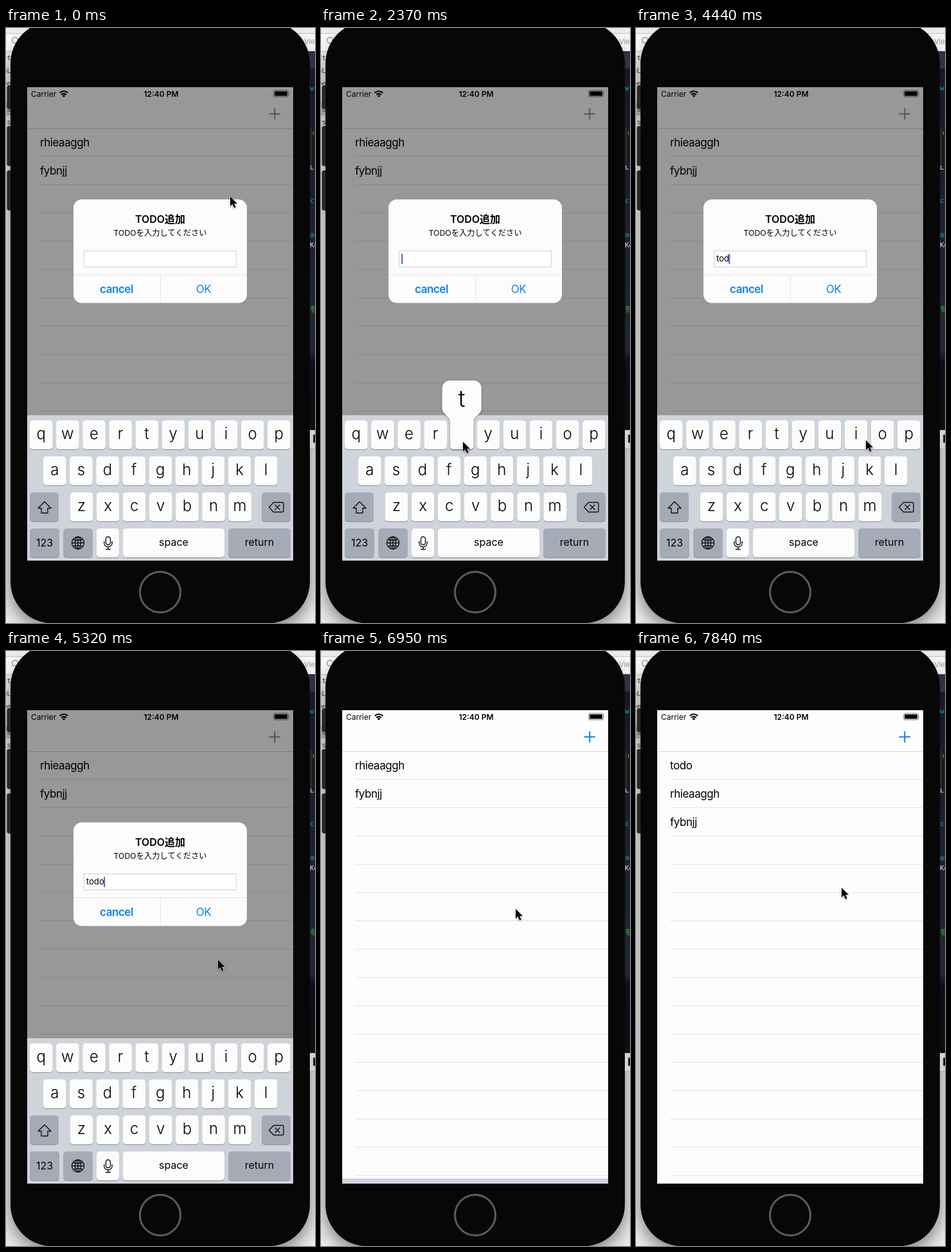
An HTML page for the animation above (7.99 s loop, 481 by 925 pixels).

```html
<!DOCTYPE html>
<html lang="ja">
<head>
<meta charset="utf-8">
<title>Todo entry</title>
<style>
html, body { margin: 0; width: 100%; height: 100%; overflow: hidden; background: #e9e9e9; }
svg { display: block; width: 100%; height: 100%; font-family: Inter, 'Noto Sans CJK JP', 'Noto Sans CJK', sans-serif; }
.mid { text-anchor: middle; }
.body { font-size: 17px; letter-spacing: -.45px; }
.line { fill: none; stroke: #111; stroke-width: 1.4; stroke-linejoin: round; }
.letter { font-size: 24px; font-weight: 300; text-anchor: middle; }
.code { font: 11px 'DejaVu Sans Mono', 'Noto Sans CJK JP', monospace; }
</style>
</head>
<body>
<svg viewBox="0 0 481 925">
  <defs>
    <filter id="blur" x="-20%" width="140%"><feGaussianBlur stdDeviation="14"/></filter>
    <filter id="soft" x="-40%" y="-40%" width="180%" height="180%"><feDropShadow dx="0" dy="1" stdDeviation="1.5" flood-opacity=".4"/></filter>
    <clipPath id="screen"><path d="M33 92h414v736H33z"/></clipPath>
    <clipPath id="list"><path d="M33 157h414v671H33z"/></clipPath>
    <linearGradient id="editor" x2="0" y2="1">
      <stop stop-color="#161a24"/><stop offset=".78" stop-color="#202634"/><stop offset=".81" stop-color="#0d1018"/><stop offset="1" stop-color="#0a0d14"/>
    </linearGradient>
  </defs>

  <!-- desktop behind the phone -->
  <path fill="#ececec" d="M0 0h481v925H0z"/>
  <path fill="#f7f7f7" d="M0 8h481v28H0z"/>
  <path stroke="#c4c4c4" d="M0 8.500h481M0 36.500h481"/>
  <circle class="line" cx="14" cy="19" r="4.500" style="stroke:#999"/>
  <path fill="#c2c2c2" d="M0 116h9v20H0z"/>
  <rect x="7" y="14" width="466" height="920" rx="65" opacity=".5" filter="url(#blur)"/>
  <path fill="url(#editor)" d="M470 63h11v562h-11z"/>
  <path fill="#2c3240" d="M470 36h11v27h-11z"/>
  <path fill="#d2d2d2" d="M470 625h11v28h-11z"/>
  <path stroke="#aaa" d="M470 653.500h11M481 632h-3v13h3"/>
  <text x="464" y="25" font-size="11" fill="#a08c80">View</text>
  <g id="fragments"></g>

  <!-- phone -->
  <g fill="#292929" stroke="#111">
    <rect x="2" y="90" width="10" height="35" rx="2"/>
    <rect x="2" y="153" width="10" height="61" rx="2"/>
    <rect x="2" y="222" width="10" height="61" rx="2"/>
    <rect x="466" y="153" width="11.500" height="60" rx="2"/>
  </g>
  <rect x="7" y="-10" width="466" height="935.500" rx="65" fill="#070707"/>
  <circle cx="240" cy="877" r="31.500" fill="none" stroke="#5c5c5c" stroke-width="3"/>

  <g clip-path="url(#screen)">
    <path fill="#fdfdfd" d="M33 92h414v736H33z"/>
    <path id="separators" stroke="#e2e2e4"/>
    <path stroke="#d2d2d3" d="M33 156.500h414"/>
    <g class="body" clip-path="url(#list)">
      <text id="newRow" x="53">todo</text>
      <g id="oldRows"><text x="53" y="184">rhieaaggh</text><text x="53" y="228">fybnjj</text></g>
    </g>
    <path id="dim" fill="#000" opacity=".4" d="M33 92h414v736H33z"/>
    <text x="39" y="107" font-size="12">Carrier</text>
    <text class="mid" x="241.500" y="107" font-size="12" font-weight="600">12:40 PM</text>
    <g fill="none" stroke="#000" stroke-width="2.200">
      <path d="M83.700 100.800a9 9 0 0 1 12.600 0M86.200 103.600a5.400 5.400 0 0 1 7.600 0"/>
    </g>
    <path d="M90 107.800l-2.300-2.400a3.300 3.300 0 0 1 4.600 0z"/>
    <rect x="416.500" y="97" width="23" height="10" rx="2.500" fill="none" stroke="#000" stroke-opacity=".5"/>
    <rect x="418" y="98.500" width="20" height="7" rx="1"/>
    <path opacity=".5" d="M440.500 100q1.500 2 0 4z"/>
    <path id="plus" stroke-width="2" d="M409.500 133.500h17.500M418.300 124.800v17.500"/>

    <g id="alert">
      <rect x="105" y="266.500" width="270" height="161" rx="13" fill="#fcfcfc"/>
      <path id="pressed" fill="#e6e6e6" d="M241 384h134v30.500a13 13 0 0 1-13 13H241z"/>
      <path stroke="#e4e4e5" d="M105 383.500h270M240.500 384v43.500"/>
      <text class="mid" x="240" y="302.500" font-size="16" font-weight="600">TODO追加</text>
      <text class="mid" x="240" y="322.500" font-size="12.300">TODOを入力してください</text>
      <rect x="121.500" y="346.500" width="237" height="25" fill="#fff" stroke="#d2d2d2"/>
      <text id="entry" x="125" y="363" font-size="13"></text>
      <path id="caret" fill="#3f62d8" d="M0 351h2v16H0z"/>
      <g class="body mid" fill="#0f7ff2">
        <text x="172" y="412" font-weight="600">cancel</text><text x="307.500" y="412">OK</text>
      </g>
    </g>

    <g id="keyboard">
      <path fill="#cfd3da" d="M33 602h414v226H33z"/>
      <g id="keys"></g>
      <g class="line">
        <path d="M60 736.500l10 10h-5v7.500H55v-7.500h-5z"/>
        <path d="M409.500 745l7-7.500H430q2 0 2 2v11q0 2-2 2h-13.500zM418.500 741l8 8m0-8l-8 8"/>
        <circle cx="112" cy="800.500" r="9.500"/><ellipse cx="112" cy="800.500" rx="4.500" ry="9.500"/>
        <path d="M102.500 800.500h19M112 791v19M104.500 795q7.500 3 15 0M104.500 806q7.500-3 15 0"/>
        <rect x="155.500" y="791" width="7" height="12.500" rx="3.500"/>
        <path d="M152.800 798v2.500a6.200 6.200 0 0 0 12.400 0V798M159 807v3.500M155 810.500h8"/>
      </g>
      <g class="mid" font-size="16">
        <text x="60" y="806">123</text><text x="261" y="805">space</text><text x="394.500" y="805">return</text>
      </g>
      <g id="popup">
        <path fill="#fcfcfc" filter="url(#soft)" d="M-18 102V64C-18 55-30.500 53-30.500 43V12a12 12 0 0 1 12-12h37a12 12 0 0 1 12 12v31C30.500 53 18 55 18 64v38a5 5 0 0 1-5 5h-26a5 5 0 0 1-5-5z"/>
        <text id="popupLetter" class="mid" y="41" font-size="36" font-weight="300"></text>
      </g>
    </g>
  </g>
  <path id="cursor" stroke="#fff" stroke-width="1" paint-order="stroke" filter="url(#soft)" d="M0 0v15l3.500-3.200 2.600 5.900 2.600-1.100-2.600-5.700h4.900z"/>
</svg>
<script>
const LOOP = 7990, STEP = 147.9;
const $ = id => document.getElementById(id);
const put = (id, name, value) => $(id).setAttribute(name, value);
const show = (id, on) => put(id, 'visibility', on ? 'visible' : 'hidden');

// Static repeats
put('separators', 'd', Array.from({ length: 15 }, (_, i) => `M53 ${199.5 + 44 * i}h394`).join(''));

const fragment = (x, y, text, color, anchor = 'start') =>
  `<text class="code" x="${x}" y="${y}" fill="${color}" text-anchor="${anchor}">${text}</text>`;
$('fragments').innerHTML =
  [[50, 'st'], [70, 'oL'], [90, 'De'], [130, '.s'], [150, 'ets'], [190, 'p'], [210, 't']]
    .map(([y, s]) => fragment(8, y, s, '#333', 'end')).join('') +
  [[97, 'w', '#18a5b8'], [166, 'a', '#ddd'], [220, 'L', '#ddd'], [272, 'cl', '#18a5b8'],
   [325, 'au', '#18a5b8'], [341, 'Ke', '#ddd'], [441, 'を', '#35b94a']]
    .map(([y, s, color]) => fragment(473, y, s, color)).join('');

const key = (x, y, width, color = '#fcfcfc') =>
  `<rect x="${x}" y="${y + 1}" width="${width}" height="45" rx="5" fill="#898d94"/>` +
  `<rect x="${x}" y="${y}" width="${width}" height="45" rx="5" fill="${color}"/>`;
const GREY = '#a5abb6', keyCentre = {};
let keys = '';
[['qwertyuiop', 37], ['asdfghjkl', 58], ['zxcvbnm', 99.7]].forEach(([row, left], r) => {
  [...row].forEach((letter, i) => {
    const x = left + 41.1 * i, y = 610 + 56 * r;
    keyCentre[letter] = [x + 17.8, y];
    keys += key(x, y, 35.7) + `<text class="letter" x="${x + 17.8}" y="${y + 29}">${letter}</text>`;
  });
});
$('keys').innerHTML = keys + key(37, 722, 45, GREY) + key(398, 722, 45, GREY) + key(37, 778, 46, GREY) +
  key(89.5, 778, 45.5, GREY) + key(141, 778, 35, '#fcfcfc') + key(182, 778, 158) + key(346, 778, 97, GREY);

// Cursor tip: step, x, y
const path = [
  [0, 349, 262], [7, 349, 262], [8, 345, 290], [11, 283, 536], [13, 230, 636], [15, 221, 644], [18, 221, 642],
  [20, 370, 632], [21, 378, 632], [22, 346, 631], [23, 230, 677], [24, 165, 690], [25, 158, 694],
  [26, 158, 694], [28, 230, 682], [30, 358, 641], [31, 366, 638], [33, 380, 638], [34, 378, 630],
  [36, 330, 480], [38, 303, 401], [52, 303, 401], [53, 320, 368]
];
function cursorAt(step) {
  const i = path.findIndex(p => p[0] >= step);
  if (i < 1) return path[0].slice(1);
  const [s0, x0, y0] = path[i - 1], [s1, x1, y1] = path[i], k = (step - s0) / (s1 - s0);
  return [x0 + (x1 - x0) * k, y0 + (y1 - y0) * k];
}

// Key presses: letter, first step, step at which the letter is entered
const presses = [['t', 16, 18], ['o', 21, 23], ['d', 25, 27], ['o', 33, 35]];
const BLINK = [.5, 1, 1, .6, .25, 0, 0];
function caretOpacity(step) {
  if (step < 1 || step > 44) return 0;
  if (step < 16) return BLINK[(step - 1) % 7];
  return step < 37 ? 1 : BLINK[(step - 37) % 7];
}

function draw(step) {
  const modal = step < 47;
  put('dim', 'opacity', modal ? .4 : 0);
  put('plus', 'stroke', modal ? '#555' : '#0f7ff2');
  put('alert', 'display', modal ? 'inline' : 'none');
  put('pressed', 'opacity', step === 44 ? 1 : 0);

  const typed = presses.filter(p => step >= p[2]).map(p => p[0]).join('');
  $('entry').textContent = typed;
  if (modal) {
    const width = typed ? $('entry').getComputedTextLength() : 0;
    put('caret', 'transform', `translate(${125.2 + width - (typed ? .7 : 0)})`);
    put('caret', 'opacity', caretOpacity(step));
  }

  const press = presses.find(p => step >= p[1] && step < p[2]);
  show('popup', press);
  if (press) {
    const [x, y] = keyCentre[press[0]];
    put('popup', 'transform', `translate(${x} ${y - 62})`);
    $('popupLetter').textContent = press[0];
  }
  put('keyboard', 'transform', `translate(0 ${modal ? 0 : step === 47 ? 218 : 240})`);

  const inserted = step < 48 ? 0 : [.35, .85][step - 48] ?? 1;
  put('oldRows', 'transform', `translate(0 ${44 * inserted})`);
  put('newRow', 'y', 140 + 44 * inserted);
  put('newRow', 'opacity', inserted);

  put('cursor', 'transform', `translate(${cursorAt(step)})`);
}

function tick(now) {
  draw(Math.min(53, Math.floor((now % LOOP + 6) / STEP)));
  requestAnimationFrame(tick);
}
requestAnimationFrame(tick);
</script>
</body>
</html>
```
